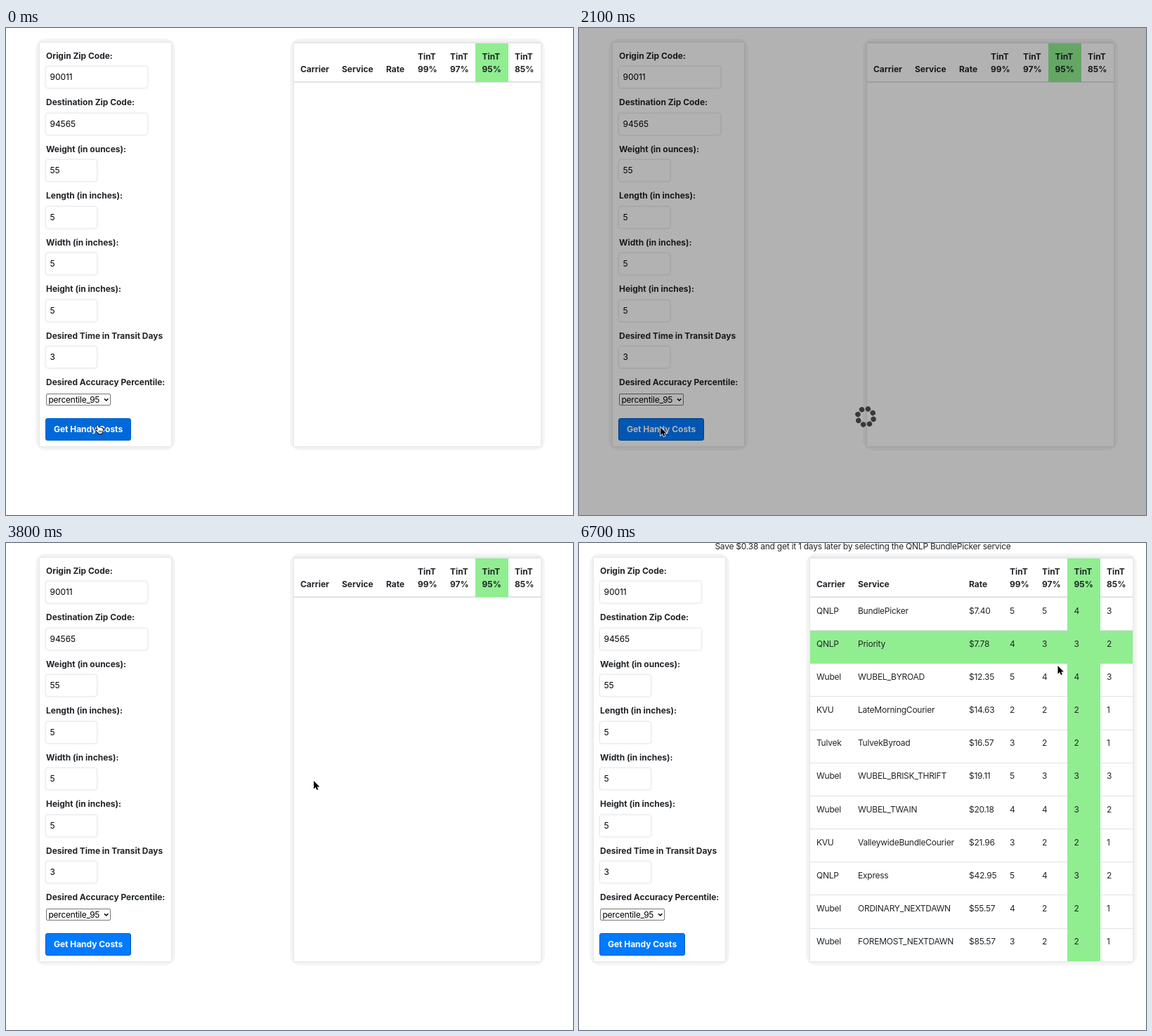
An HTML page for the animation above (6.8 s loop, 807x694 px).

```html
<!DOCTYPE html>
<html lang="en">
<head>
<meta charset="utf-8">
<title>Shipping rates</title>
<style>
  html, body { margin: 0; width: 100%; height: 100%; overflow: hidden; background: #fff; }
  #stage {
    position: relative; width: 807px; height: 694px; overflow: hidden; background: #fff;
    font: 12px/18px Inter, "Open Sans", sans-serif; letter-spacing: -.02em; color: #212529;
  }
  #stage div, #stage svg { position: absolute; }
  .t { white-space: pre; }
  .b { font-weight: 700; letter-spacing: -.002em; }
  .halo { top: 15px; height: 587px; border-radius: 15px; background: #f5f5f5; }
  .card { top: 21px; height: 575px; background: #fff; box-shadow: 0 0 4px rgba(0, 0, 0, .13); }
  .field {
    left: 56px; height: 32px; box-sizing: border-box; border: 1px solid #ececec; border-radius: 4px;
    box-shadow: 0 0 3px rgba(0, 0, 0, .1); line-height: 30px; padding-left: 5.5px; color: #000;
    background: #fff; letter-spacing: -.005em;
  }
  .select {
    left: 57px; top: 521px; width: 92px; height: 17px; box-sizing: border-box;
    border: 1px solid #767676; border-radius: 2px; background: #fff; color: #000;
    line-height: 15px; padding-left: 2.5px;
  }
  .button {
    left: 56px; top: 556px; width: 122px; height: 32px; box-sizing: border-box;
    border: 1px solid #0062cc; border-radius: 3px; background: #0069d9; color: #fff;
    text-align: center; line-height: 29px;
  }
  .button.focus { background: #007bff; border-color: #0055b0; }
  .green { background: #90ee90; }
  .line { height: 1px; background: #dee2e6; }
  #note { left: 0; top: -4.5px; width: 808px; text-align: center; }
  #dim { inset: 0; background: rgba(0, 0, 0, .3); }
  #spin { left: 392px; top: 538px; }
  #arrow, #hand { left: 0; top: 0; overflow: visible; }
</style>
</head>
<body>
<div id="stage">
  <div id="note" class="t">Save $0.38 and get it 1 days later by selecting the QNLP BundlePicker service</div>
  <div id="form"></div>
  <div id="empty"></div>
  <div id="full"></div>
  <div id="dim">
    <svg id="spin" width="32" height="32" viewBox="-16 -16 32 32"><g id="dots" fill="#383838"></g></svg>
  </div>
  <svg id="hand" width="14" height="15">
    <path d="M3.2 1.2C4.3.3 5.2 1 5.6 2.1L6.4 4.2C7.2 3.5 8.1 3.7 8.5 4.5 9.2 4 10.1 4.2 10.5 5.1 11.5 4.8 12.2 5.4 12.3 6.5 12.6 9 12 10.8 11 12.2V13.6H5.6V12.5L1.2 8.7C.2 7.6 1.3 6.6 2.4 7.2L4 8.2 2.6 3.1C2.4 2.3 2.6 1.6 3.2 1.2Z" fill="#fff" stroke="#000"/>
    <path d="M6.6 8.6V11.4M8.4 8.6V11.4M10.1 8.6V11.4" stroke="#000" stroke-width=".8"/>
  </svg>
  <svg id="arrow" width="12" height="16">
    <path d="M0 0V11.6L2.7 9.1 4.5 13.1 6.4 12.3 4.7 8.4H8.4Z" fill="#000" stroke="#fff" stroke-width="1.4" paint-order="stroke"/>
  </svg>
</div>
<script>
const $ = id => document.getElementById(id);

function add(parent, cls, style = {}, text = "") {
  const el = document.createElement("div");
  el.className = cls;
  for (const key in style) el.style[key] = style[key] + "px";
  el.textContent = text;
  parent.appendChild(el);
  return el;
}

// y is the middle of the capitals
const label = (parent, x, y, text, bold) =>
  add(parent, bold ? "t b" : "t", { left: x, top: y - 9 }, text);

function panel(parent, left, right) {
  add(parent, "halo", { left: left - 6, width: right - left + 12 });
  add(parent, "card", { left, width: right - left });
}

function buildForm(form) {
  panel(form, 48, 235);
  const fields = [
    ["Origin Zip Code:", "90011"], ["Destination Zip Code:", "94565"],
    ["Weight (in ounces):", "55"], ["Length (in inches):", "5"],
    ["Width (in inches):", "5"], ["Height (in inches):", "5"],
    ["Desired Time in Transit Days", "3"], ["Desired Accuracy Percentile:"]
  ];
  fields.forEach(([name, value], i) => {
    const y = 39.5 + 66.5 * i;
    label(form, 57, y, name, true);
    if (value) add(form, "t field", { top: y + 14.5, width: i < 2 ? 146 : 74 }, value);
  });
  const select = add(form, "t select", {}, "percentile_95");
  select.insertAdjacentHTML("beforeend",
    '<svg style="left:81px;top:5px" width="8" height="6"><path d="M1 1.2 3.7 4 6.4 1.2" fill="none" stroke="#000" stroke-width="1.5"/></svg>');
  return add(form, "t b button", {}, "Get Handy Costs");
}

function buildTable(box, left, right, greenLeft, cols, rows) {
  const width = right - left;
  const rowTop = i => 77.3 + 47.15 * i;
  const bottom = rows.length ? 596 : 77;
  panel(box, left, right);
  const line = y => add(box, "line", { left, top: Math.round(y), width });
  line(21);
  line(76).style.height = "1.5px";
  rows.forEach((row, i) => i && line(rowTop(i) - .3));
  add(box, "green", { left: greenLeft, top: 22, width: 46.5, height: bottom - 22 });
  if (rows.length) add(box, "green", { left, top: 125, width, height: 47 });

  ["Carrier", "Service", "Rate"].forEach((name, i) => label(box, cols[i], 58.5, name, true));
  [99, 97, 95, 85].forEach((pct, i) => {
    label(box, cols[i + 3], 40.5, "TinT", true);
    label(box, cols[i + 3], 58.5, pct + "%", true);
  });
  rows.forEach(([carrier, service, rate, days], i) =>
    [carrier, service, "$" + rate, ...days].forEach((text, c) =>
      label(box, cols[c], rowTop(i) + 19.4, text)));
}

const rates = [
  ["QNLP", "BundlePicker", "7.40", "5543"],
  ["QNLP", "Priority", "7.78", "4332"],
  ["Wubel", "WUBEL_BYROAD", "12.35", "5443"],
  ["KVU", "LateMorningCourier", "14.63", "2221"],
  ["Tulvek", "TulvekByroad", "16.57", "3221"],
  ["Wubel", "WUBEL_BRISK_THRIFT", "19.11", "5333"],
  ["Wubel", "WUBEL_TWAIN", "20.18", "4432"],
  ["KVU", "ValleywideBundleCourier", "21.96", "3221"],
  ["QNLP", "Express", "42.95", "5432"],
  ["Wubel", "ORDINARY_NEXTDAWN", "55.57", "4221"],
  ["Wubel", "FOREMOST_NEXTDAWN", "85.57", "3221"]
];

const button = buildForm($("form"));
buildTable($("empty"), 410, 761, 668, [419, 478, 541, 586, 632, 677.5, 724], []);
buildTable($("full"), 329, 788, 695, [338, 397, 555, 613, 659, 704.5, 751], rates);

for (let i = 0; i < 8; i++) {
  const a = i * Math.PI / 4;
  $("dots").insertAdjacentHTML("beforeend",
    `<circle cx="${11.6 * Math.sin(a)}" cy="${-11.6 * Math.cos(a)}" r="3.7"/>`);
}

const LOOP = 6800, STEP = 100, CLICK = 1100, LOADED = 3800, FILLED = 4300;

// time, x, y of the pointer
const path = [
  [0, 128, 569], [800, 128, 569], [1100, 123, 569.5], [2100, 116, 569],
  [2400, 116, 569], [2800, 190, 527], [3700, 422, 359.5], [3800, 438, 339],
  [4300, 508.5, 236], [4800, 508.5, 236], [5300, 640, 195], [5400, 640, 195],
  [6100, 664, 184], [6700, 681.5, 175], [6800, 681.5, 175]
];

function pointAt(t) {
  const i = path.findIndex(p => p[0] > t);
  const [t0, x0, y0] = path[i - 1], [t1, x1, y1] = path[i];
  const k = (t - t0) / (t1 - t0);
  return [x0 + (x1 - x0) * k, y0 + (y1 - y0) * k];
}

const show = (id, on) => { $(id).style.visibility = on ? "visible" : "hidden"; };

function draw() {
  const now = (performance.now() + 10) % LOOP;
  const t = Math.floor(now / STEP) * STEP;
  const clicked = t >= CLICK, filled = t >= FILLED;
  const [x, y] = pointAt(t);

  button.classList.toggle("focus", clicked);
  $("form").style.transform = filled ? "translateX(-27px)" : "none";
  show("note", filled);
  show("full", filled);
  show("empty", !filled);
  show("dim", clicked && t < LOADED);
  show("arrow", clicked);
  show("hand", !clicked);
  $("dots").setAttribute("transform", `rotate(${2 + (t - CLICK) * .24})`);
  $("arrow").style.transform = `translate(${x}px, ${y}px)`;
  $("hand").style.transform = `translate(${x - 2}px, ${y - 4}px)`;
  requestAnimationFrame(draw);
}
draw();
</script>
</body>
</html>
```
